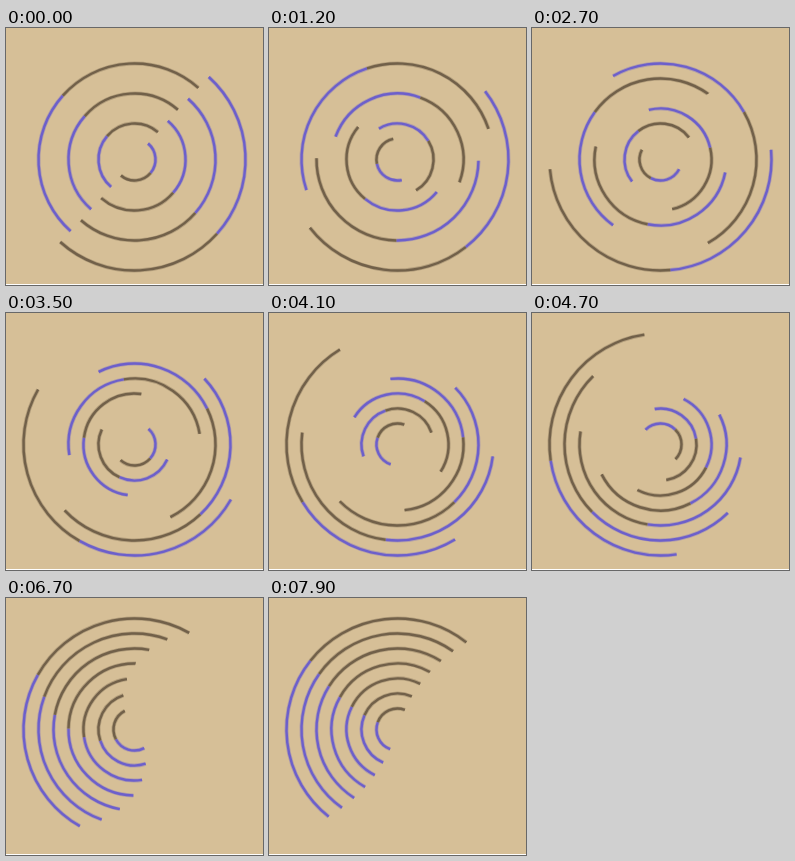
An HTML page with a canvas that plays this animation: 257x257 px, repeating every 8 s.

```html
<!DOCTYPE html>
<html lang="en">
<head>
<meta charset="utf-8">
<title>Nested arcs</title>
<style>
html, body { margin: 0; width: 100%; height: 100%; overflow: hidden; background: #d6bf97; }
canvas { display: block; width: 100vw; height: 100vh; }
</style>
</head>
<body>
<canvas id="stage"></canvas>
<script>
const SIZE = 257, LOOP = 8000, STEP = 100;
const CX = 128.5, CY = 131.5, OUTER = 111, GAP = 15, RINGS = 7;
const BG = '#d6bf97', EDGE = '#ffffff', BROWN = '#716049', VIOLET = '#6c5fcb';
const START = -48, HALF = 180;
const SWING = 9;      // seconds of one half turn of the outer ring
const RELEASE = 3.5;  // when the inner rings stop gaining speed

const canvas = document.getElementById('stage');
const ctx = canvas.getContext('2d');

// Same curve as the CSS cubic-bezier() timing function.
function bezier(x1, y1, x2, y2) {
  const at = (a, b, u) => 3 * (1 - u) * u * ((1 - u) * a + u * b) + u * u * u;
  return x => {
    let lo = 0, hi = 1;
    for (let i = 0; i < 30; i++) {
      const mid = (lo + hi) / 2;
      if (at(x1, x2, mid) < x) lo = mid; else hi = mid;
    }
    return at(y1, y2, lo);
  };
}

const ease = bezier(0.533, 0.135, 0.27, 0.93);

const outerTurn = t => HALF * ease(t / SWING);

// Turn of each ring against the one around it: exponential in, then out.
const innerTurn = t => t < RELEASE
  ? 26.7 * Math.exp(0.46 * t) - 27
  : HALF + 4.2 - 77.2 * Math.exp(-0.54 * (t - RELEASE));

function quarter(radius, deg, color) {
  const from = deg * Math.PI / 180;
  ctx.strokeStyle = color;
  ctx.beginPath();
  ctx.arc(CX, CY, radius, from, from + Math.PI / 2);
  // A faint wide stroke below the solid one softens the edge.
  ctx.globalAlpha = 0.35;
  ctx.lineWidth = 4;
  ctx.stroke();
  ctx.globalAlpha = 1;
  ctx.lineWidth = 2.4;
  ctx.stroke();
}

function draw(ms) {
  const t = Math.floor(ms / STEP) * STEP / 1000;
  ctx.setTransform(canvas.width / SIZE, 0, 0, canvas.height / SIZE, 0, 0);
  ctx.fillStyle = BG;
  ctx.fillRect(0, 0, SIZE, SIZE);
  ctx.fillStyle = EDGE;
  ctx.fillRect(0, SIZE - 1, SIZE, 1);
  const base = outerTurn(t), add = innerTurn(t);
  for (let i = 0; i < RINGS; i++) {
    const radius = OUTER - i * GAP;
    const deg = START + base + i * (HALF + add);
    quarter(radius, deg, VIOLET);
    quarter(radius, deg + 90, BROWN);
  }
}

function resize() {
  const ratio = window.devicePixelRatio || 1;
  canvas.width = Math.round(innerWidth * ratio);
  canvas.height = Math.round(innerHeight * ratio);
}

const begin = performance.now();
function frame() {
  draw((performance.now() - begin) % LOOP);
  requestAnimationFrame(frame);
}

addEventListener('resize', resize);
resize();
frame();
</script>
</body>
</html>
```
